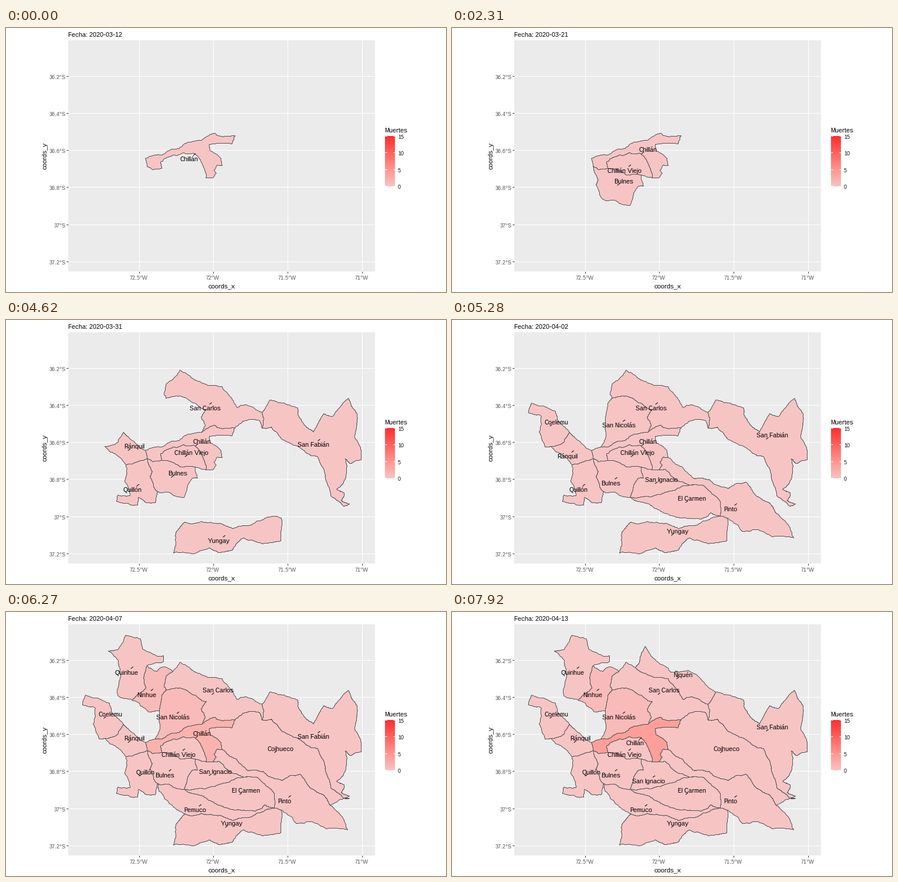
Write a matplotlib script that moves like this. It is 750 by 450 pixels and loops after 8000 ms.

```python
import numpy as np
import matplotlib.pyplot as plt
from matplotlib.animation import FuncAnimation
from matplotlib.colors import LinearSegmentedColormap
from matplotlib.patches import Polygon, Rectangle

W, H, DPI = 750, 450, 100
PT = 72 / DPI                       # one pixel in points
STEP, TICK, LOOP = 330, 40, 8000    # ms

plt.rcParams.update({
    "font.family": "Liberation Sans",
    "text.hinting": "native",
    "text.hinting_factor": 1,
})
rng = np.random.default_rng(12)
borders = {}


def roughen(pts, amount=0.055):
    """Midpoint displacement, then rounding to whole pixels."""
    while np.hypot(*np.diff(pts, axis=0).T).max() > 3:
        d = np.diff(pts, axis=0)
        mid = pts[:-1] + d / 2
        mid += d[:, ::-1] * (-1, 1) * rng.normal(0, amount, (len(d), 1))
        pts = np.insert(pts, np.arange(1, len(pts)), mid, axis=0)
    return np.round(pts) + 0.5


def border(owners, *pts):
    """Rough line through key points, shared by one or two communes."""
    path = roughen(np.array(pts, float))
    for name in owners.split("|"):
        borders.setdefault(name, []).append(path)


def outline(name):
    """Chain the borders of a commune end to end."""
    rest = list(borders[name])
    ring = rest.pop(0)
    while rest:
        k = next(k for k, p in enumerate(rest)
                 if (p[[0, -1]] == ring[-1]).all(axis=1).any())
        p = rest.pop(k)
        ring = np.vstack([ring, p if (p[0] == ring[-1]).all() else p[::-1]])
    return ring


def centroid(p):
    q = np.roll(p, -1, axis=0)
    cross = p[:, 0] * q[:, 1] - q[:, 0] * p[:, 1]
    return ((p + q) * cross[:, None]).sum(axis=0) / (3 * cross.sum())


# Points where borders meet
a, b, c, d, e = (240, 91), (215, 150), (284, 101), (272, 133), (261, 168)
f, g, h, i, j = (312, 94), (436, 157), (449, 136), (436, 184), (390, 183)
k, l, m, n, o = (333, 191), (253, 216), (368, 234), (352, 255), (340, 255)
p, q, r, s, t = (265, 239), (240, 236), (237, 222), (322, 250), (303, 302)
u, v, w, x, y = (258, 292), (204, 246), (200, 191), (168, 215), (417, 280)
z, pin_yun, pem_yun, sf_coi, coi_pin = (457, 334), (469, 337), (305, 344), (575, 317), (552, 329)

# Borders between neighbours
border("Quirihue|Ninhue", a, (234, 112), (238, 129), b)
border("Ninhue|San Carlos", c, (273, 108), (269, 126), d)
border("Ninhue|San Nicolás", d, (266, 140), e)
border("San Carlos|Ñiquén", f, (322, 102), (345, 111), (368, 113), (394, 149), (407, 144), g)
border("Ñiquén|San Fabián", h, (441, 151), g)
border("San Carlos|San Fabián", g, (438, 173), i)
border("San Carlos|Coihueco", i, (432, 171), (411, 170), j)
border("San Carlos|Chillán", j, (370, 185), (355, 179), k)
border("San Carlos|San Nicolás", k, (339, 178), (332, 165), (341, 152), (314, 138), (290, 129), d)
border("San Fabián|Coihueco", i, (452, 182), (468, 201), (510, 225), (530, 232), (544, 264),
       (553, 298), sf_coi)
border("Coihueco|Pinto", coi_pin, (541, 311), (519, 300), (500, 276), (470, 287), (438, 271),
       (412, 270), m)
border("Chillán|Coihueco", m, (366, 222), (347, 208), (346, 198), (385, 197), j)
border("Chillán|Pinto", m, (360, 233), (354, 242), (358, 247), n)
border("Chillán|San Ignacio", n, o)
border("Chillán|Chillán Viejo", o, (333, 229), (320, 213), (284, 216), (263, 228), p)
border("Chillán|Bulnes", p, (249, 241), q)
border("Chillán|Ránquil", q, r)
border("Chillán|San Nicolás", l, (282, 206), (305, 196), k)
border("Chillán Viejo|Bulnes", p, (275, 239), (296, 250), s)
border("Chillán Viejo|San Ignacio", s, o)
border("Bulnes|San Ignacio", s, (326, 269), (317, 269), (309, 281), t)
border("Bulnes|Pemuco", t, (285, 299), (276, 293), u)
border("Bulnes|Quillón", u, (245, 267), (249, 258), q)
border("Quillón|Ránquil", v, (218, 243), q)
border("Ránquil|Coelemu", w, (186, 211), x)
border("San Ignacio|Pinto", n, (363, 254), (380, 271), (404, 281), y)
border("San Ignacio|El Carmen", y, (372, 291), (340, 301), t)
border("El Carmen|Pinto", y, (437, 290), (457, 309), z)
border("El Carmen|Pemuco", z, (441, 328), (425, 339), (382, 336), (330, 312), t)
border("Pemuco|Yungay", z, (414, 350), (385, 355), (358, 346), pem_yun)
border("Yungay|Pinto", z, pin_yun)

# Outer borders
border("Quirihue", b, (190, 142), (195, 105), (191, 82), (174, 66), (190, 64), (204, 39),
       (229, 46), (232, 62), (257, 75), (268, 74), (268, 84), a)
border("Ninhue", a, (257, 101), (269, 93), c)
border("Ninhue", e, (243, 170), b)
border("San Carlos", c, (296, 85), f)
border("Ñiquén", f, (318, 88), (329, 58), (372, 102), (402, 99), h)
border("San Fabián", sf_coi, (585, 313), (571, 308), (576, 294), (563, 288), (574, 278),
       (578, 236), (586, 244), (605, 238), (594, 200), (598, 160), (583, 133), (556, 164),
       (541, 159), (524, 190), (510, 180), (497, 150), h)
border("Coihueco", sf_coi, (585, 317), coi_pin)
border("Chillán", r, l)
border("San Nicolás", e, (262, 190), l)
border("Quillón", u, (254, 311), (238, 311), (225, 302), (224, 315), (188, 309), (190, 298),
       (211, 299), (202, 275), v)
border("Ránquil", r, (208, 199), w)
border("Ránquil", x, (186, 228), v)
border("Coelemu", x, (158, 216), (148, 190), (152, 164), (130, 158), (135, 141), (176, 155),
       (180, 172), w)
border("Pemuco", pem_yun, (284, 331), (260, 305), u)
border("Yungay", pin_yun, (468, 376), (437, 381), (404, 371), (385, 392), (364, 396),
       (346, 388), (285, 397), (289, 362), pem_yun)
border("Pinto", pin_yun, (494, 360), (520, 357), (545, 369), (582, 371), (568, 343), coi_pin)

fig = plt.figure(figsize=(W / DPI, H / DPI), dpi=DPI, facecolor="white")
ax = fig.add_axes([0, 0, 1, 1])
ax.axis("off")
cmap = LinearSegmentedColormap.from_list(
    "deaths", [(0, "#f7c4c4"), (0.27, "#ff9f98"), (1, "#ff2f2f")])


def text(px, py, label, size=11, color="black", **kw):
    return ax.text(px, py, label, fontsize=size * PT + 0.01, color=color, **kw)


def line(xs, ys, color, order=1):
    return ax.plot(xs, ys, color=color, lw=PT, solid_capstyle="butt", zorder=order)[0]


# Panel, grid and axes
ax.add_patch(Rectangle((106, 21), 523, 394, fc="#ebebeb", lw=0, zorder=0))
for step in range(4):
    px = int(227 + 126.7 * step)
    line([px, px], [21, 415], "white")
    line([px, px], [415, 418], "#333333")
    text(px - 0.5, 429, f"{72.5 - step / 2:g}°W", 9, "#4d4d4d", ha="center")
for step in range(6):
    py = int(82.3 + 63.2 * step)
    line([106, 629], [py, py], "white")
    line([103, 106], [py, py], "#333333")
    text(101.5, py + 5, f"{36.2 + step / 5:g}°S", 9, "#4d4d4d", ha="right")
text(367.5, 443, "coords_x", ha="center")
text(66.5, 218, "coords_y", ha="center", va="center", rotation=90)
title = text(106, 15, "")

# Legend
text(645.5, 178, "Muertes")
ax.imshow(np.linspace(1, 0, 86)[:, None], cmap=cmap, aspect="auto",
          extent=(646, 663, 270, 184), interpolation="bilinear")
for deaths in range(0, 16, 5):
    py = 269 - deaths * 85 / 15
    line([646, 649], [py, py], "white", 3)
    line([660, 663], [py, py], "white", 3)
    text(668, py + 5, deaths, 9)
ax.set(xlim=(0, W), ylim=(H, 0))


class Commune:
    """Appears at step `first`; its label swaps sides of the centroid at `flips`."""

    def __init__(self, name, first, side, *flips, deaths=lambda step: 0):
        self.first, self.side, self.flips, self.deaths = first, side, flips, deaths
        shape = outline(name)
        self.center = centroid(shape)
        self.patch = ax.add_patch(Polygon(shape, ec="#555555", lw=PT, snap=False, zorder=4))
        self.label = text(0, 0, name, ha="center", zorder=6)
        self.leader = line([], [], "black", 7)

    def show(self, step):
        for artist in (self.patch, self.label, self.leader):
            artist.set_visible(step >= self.first)
        side = self.side * (-1) ** sum(at <= step for at in self.flips)
        cx, cy = self.center
        self.patch.set_facecolor(cmap(max(0, self.deaths(step)) / 15))
        self.label.set_position((cx + 11 * side, round(cy + 5 - 8.3 * side)))
        self.leader.set_data([cx, cx + 4 * side], [cy, cy - 3 * side])


UP, DOWN = 1, -1


def one_death(step):
    return int(step >= 18)


communes = [
    Commune("Chillán", 0, DOWN, 2, 3, 5, 24, deaths=lambda step: (step - 15) // 2),
    Commune("Chillán Viejo", 3, DOWN, 6, 7, 12, 17),
    Commune("Bulnes", 6, UP, 10, 12, 15),
    Commune("Quillón", 8, DOWN, 9, 11, 17),
    Commune("Ránquil", 8, UP, 10, 12, 15, 17),
    Commune("San Carlos", 8, UP, 9, 11, 12, 17),
    Commune("San Fabián", 12, UP, 13, 15, 18, 20),
    Commune("Yungay", 12, DOWN, 15, 17, 19),
    Commune("San Nicolás", 15, DOWN, deaths=one_death),
    Commune("San Ignacio", 15, UP, 22),
    Commune("El Carmen", 16, UP),
    Commune("Pinto", 16, DOWN),
    Commune("Coelemu", 16, UP),
    Commune("Coihueco", 17, UP),
    Commune("Ninhue", 17, DOWN, deaths=one_death),
    Commune("Pemuco", 17, DOWN),
    Commune("Quirihue", 19, DOWN),
    Commune("Ñiquén", 22, UP),
]


def draw(frame):
    step = (frame * TICK + TICK - 1) // STEP
    # 100 steps are spread evenly over 133 days
    day = np.datetime64("2020-03-12") + int(round(step * 133 / 99))
    title.set_text(f"Fecha: {day}")
    for commune in communes:
        commune.show(step)
    return []


anim = FuncAnimation(fig, draw, frames=LOOP // TICK, interval=TICK,
                     init_func=lambda: draw(0), repeat=True, repeat_delay=0)
plt.show()
```
